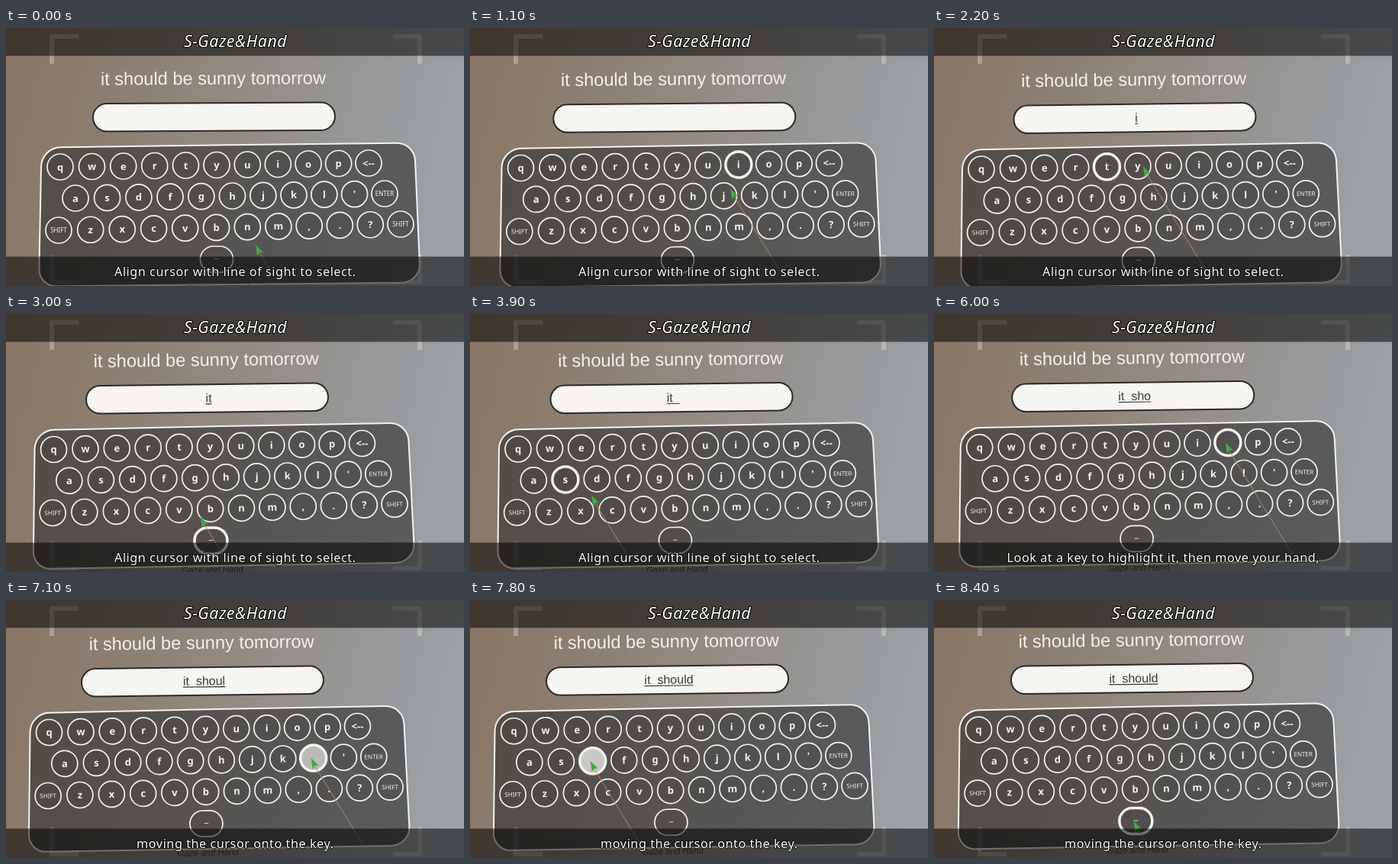
An HTML page with a canvas that plays this animation: 600 by 338 pixels, repeating every 8.5 s.

```html
<!DOCTYPE html>
<html lang="en">
<head>
<meta charset="utf-8">
<title>Gaze and hand typing</title>
<style>
  html, body { margin: 0; width: 100%; height: 100%; overflow: hidden; background: #8c8178; }
  canvas { display: block; width: 600px; height: 338px; }
</style>
</head>
<body>
<canvas id="stage" width="600" height="338"></canvas>
<script>
const ctx = document.getElementById('stage').getContext('2d');
const LOOP = 8500, STEP = 100;
const DWELL = 300;   // the hand and the gaze rest on a key after pressing it
const SETTLE = 100;  // the cursor arrives this long before the press
const GLOW = 250;
const SANS = '"Noto Sans", "Open Sans", sans-serif';
const ARIAL = '"Liberation Sans", Arial, sans-serif';
const WHITE = '#f4f2ee';
const PIVOT = { x: 272.5, y: 179.5 };

// Head movement: where the pivot of the keyboard is seen
const POSES = [
  { time: 0, x: 272.5, y: 179.5 }, { time: 2200, x: 263.5, y: 181 }, { time: 3000, x: 264, y: 173.5 },
  { time: 4800, x: 265, y: 172.5 }, { time: 7100, x: 258, y: 169.5 }, { time: 8500, x: 260, y: 166 }
];

// Each row bows slightly in x because of the perspective
function keyRow(labels, x0, y0, x1, y1) {
  return labels.split(' ').map((label, i, all) => {
    const u = i / (all.length - 1);
    return { label, x: x0 + (x1 - x0) * u + 12 * u * (1 - u), y: y0 + (y1 - y0) * u };
  });
}
const KEYS = [
  ...keyRow('q w e r t y u i o p <--', 71, 182, 475, 177),
  ...keyRow("a s d f g h j k l ' ENTER", 91, 223, 496, 217),
  ...keyRow('SHIFT z x c v b n m , . ? SHIFT', 69, 265, 517, 257),
  { label: '_', x: 276, y: 303 }
];

const PRESS_TIMES = [1650, 2500, 3200, 4200, 5050, 5750, 6400, 7000, 7750, 8500];
const PRESSES = [...'it_shoul' + 'd_'].map((label, i) => ({
  time: PRESS_TIMES[i],
  key: KEYS.find(key => key.label === label)
}));
const REST = { time: 0, key: { x: 330, y: 284 } };

const CAPTIONS = [
  { time: 0, words: 'Align cursor with line of sight to select.' },
  { time: 4000, words: 'Look at a key to highlight it, then move your hand,' },
  { time: 6600, words: 'moving the cursor onto the key.' }
];

function ease(u) {
  u = Math.min(Math.max(u, 0), 1);
  return u * u * (3 - 2 * u);
}

function between(a, b, u) {
  return { x: a.x + (b.x - a.x) * u, y: a.y + (b.y - a.y) * u };
}

function poseAt(t) {
  const i = POSES.findIndex(p => p.time > t);
  const a = POSES[i - 1], b = POSES[i];
  const angle = -.0075 * ease(t / 2200);
  return { ...between(a, b, ease((t - a.time) / (b.time - a.time))), angle };
}

function project(point, pose) {
  const dx = point.x - PIVOT.x, dy = point.y - PIVOT.y;
  const c = Math.cos(pose.angle), s = Math.sin(pose.angle);
  return { x: pose.x + dx * c - dy * s, y: pose.y + dx * s + dy * c };
}

function text(str, x, y, font, color, { outline = 0, spacing = 0 } = {}) {
  ctx.font = font;
  ctx.letterSpacing = spacing + 'px';
  if (outline) {
    ctx.strokeStyle = '#000';
    ctx.lineWidth = outline;
    ctx.strokeText(str, x, y);
  }
  ctx.fillStyle = color;
  ctx.fillText(str, x, y);
}

function pill(x, y, w, h) {
  ctx.beginPath();
  ctx.roundRect(x - w / 2, y - h / 2, w, h, h / 2);
}

function stroke(color, width) {
  ctx.strokeStyle = color;
  ctx.lineWidth = width;
  ctx.stroke();
}

function tilted(x, y, angle, drawPart) {
  ctx.save();
  ctx.translate(x, y);
  ctx.rotate(angle);
  drawPart();
  ctx.restore();
}

function drawRoom() {
  const wall = ctx.createLinearGradient(0, 80, 600, 220);
  ['#8a7766', '#8c7f73', '#938c84', '#979899', '#9ca2a7'].forEach((color, i) => wall.addColorStop(i / 4, color));
  ctx.fillStyle = wall;
  ctx.fillRect(0, 0, 600, 338);
  for (const sx of [-1, 1]) {
    for (const sy of [-1, 1]) {
      const x = 301 + sx * 241, y = 172 + sy * 161;
      ctx.beginPath();
      ctx.moveTo(x - sx * 35, y);
      ctx.lineTo(x, y);
      ctx.lineTo(x, y - sy * 36);
      stroke('rgba(235,230,220,.35)', 6);
    }
  }
}

function drawField(typed) {
  tilted(271.5, 74, -.005, () => text('it should be sunny tomorrow', 0, 0, `23.6px ${ARIAL}`, '#f2f0ee'));
  tilted(272.5, 116.5, -.005, () => {
    pill(0, 0, 317, 36.5);
    ctx.fillStyle = '#f7f5f1';
    ctx.fill();
    stroke('#2d2a28', 2);
    text(typed, 2, 5, `16px ${ARIAL}`, '#3b3937');
    const w = ctx.measureText(typed).width;
    ctx.fillRect(2 - w / 2, 6.8, w, 1.2);
  });
}

function drawPanel() {
  ctx.beginPath();
  ctx.moveTo(290, 153.2);
  ctx.arcTo(535, 150.5, 543, 333.5, 24);
  ctx.arcTo(543, 333.5, 43, 338.5, 24);
  ctx.arcTo(43, 338.5, 46.5, 156.5, 22);
  ctx.arcTo(46.5, 156.5, 290, 153.2, 26);
  ctx.closePath();
  ctx.fillStyle = 'rgba(54,54,54,.64)';
  ctx.fill();
  stroke(WHITE, 2);
  tilted(278, 345, -.015, () => text('Gaze and Hand', 0, 0, `italic 11.5px ${ARIAL}`, 'rgba(50,48,46,.8)'));
}

function drawKey({ label, x, y }, active, age) {
  const space = label === '_', word = /[A-Z]/.test(label);
  const glow = Math.max(0, 1 - (age / GLOW) ** 2);
  pill(x, y, space ? 43 : 34, 34);
  ctx.fillStyle = 'rgba(40,39,38,.12)';
  ctx.fill();
  ctx.fillStyle = `rgba(208,206,202,${glow})`;
  ctx.fill();
  stroke(WHITE, active ? 3.5 : 1.7);
  if (age < DWELL) return;
  const font = word ? `8px ${SANS}` : `600 13px ${SANS}`;
  text(label, x, y + (space ? -2 : word ? 3 : 4.5), font, WHITE);
}

function drawCursor({ x, y }) {
  ctx.beginPath();
  ctx.moveTo(x + 4, y + 9);
  ctx.lineTo(x + .6 * (318 - y), 318);
  stroke('rgba(176,138,100,.75)', 1.2);
  ctx.beginPath();
  ctx.moveTo(x, y);
  ctx.lineTo(x + 10, y + 10);
  ctx.lineTo(x + 5, y + 10);
  ctx.lineTo(x + 2, y + 15);
  ctx.fillStyle = '#42a84a';
  ctx.fill();
}

function drawTitles(t) {
  ctx.fillStyle = 'rgba(0,0,0,.54)';
  ctx.fillRect(0, 0, 600, 36.5);
  ctx.fillRect(0, 299.5, 600, 38.5);
  const caption = CAPTIONS.filter(c => c.time <= t).pop();
  text('S-Gaze&Hand', 300.5, 24.5, `italic 21.3px ${SANS}`, '#fff', { outline: 2, spacing: .5 });
  text(caption.words, 300.3, 325.3, `16.3px ${SANS}`, '#fff', { outline: 1.6, spacing: .5 });
}

function draw(t) {
  const pose = poseAt(t);
  const done = PRESSES.filter(p => p.time <= t);
  const last = done[done.length - 1] || REST;
  const next = PRESSES[done.length];
  const age = t - last.time;
  const gazed = age <= DWELL ? last.key : next.key;
  const typed = done.map(p => p.key.label.replace('_', '  ')).join('');

  ctx.textAlign = 'center';
  ctx.lineJoin = 'round';
  drawRoom();

  ctx.save();
  ctx.translate(pose.x, pose.y);
  ctx.rotate(pose.angle);
  ctx.translate(-PIVOT.x, -PIVOT.y);
  drawField(typed);
  drawPanel();
  for (const key of KEYS) drawKey(key, key === gazed, key === last.key ? age : Infinity);
  ctx.restore();

  const start = last.time + DWELL, end = next.time - SETTLE;
  const hand = between(last.key, next.key, ease((t - start) / (end - start)));
  const tip = project(hand, pose);
  drawCursor({ x: tip.x - 3, y: tip.y });
  drawTitles(t);
}

function tick() {
  const t = performance.now() % LOOP;
  draw(Math.floor(t / STEP) * STEP);
  requestAnimationFrame(tick);
}
tick();
</script>
</body>
</html>
```
